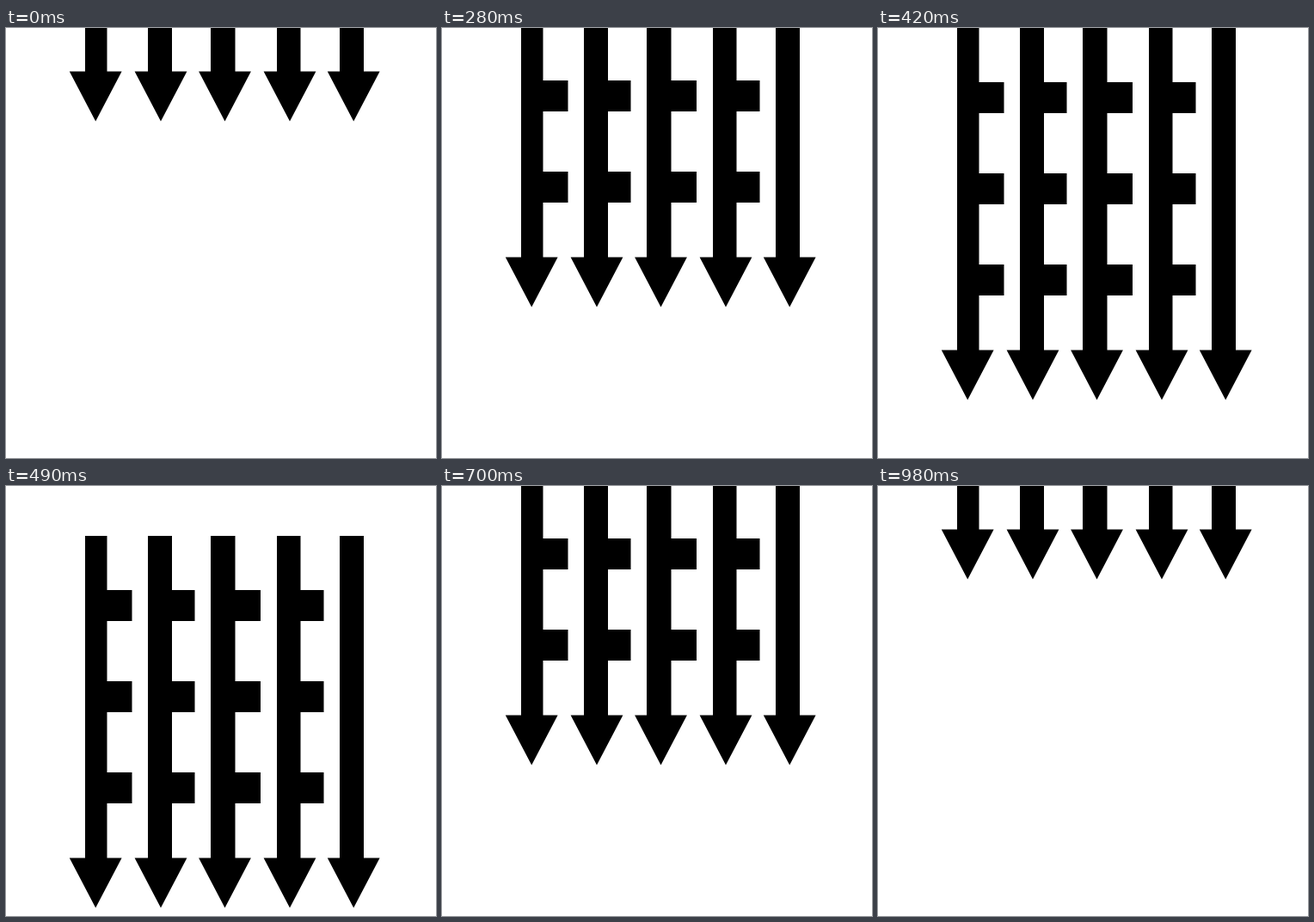
An HTML page that plays this animation: 500 by 500 pixels, repeating every 1.05 s.

```html
<!DOCTYPE html>
<html lang="en">
<head>
<meta charset="utf-8">
<title>Portcullis</title>
<style>
  html, body { margin: 0; width: 100%; height: 100%; overflow: hidden; background: #fff; }
  svg { display: block; width: 500px; height: 500px; }
</style>
</head>
<body>
<svg viewBox="0 0 500 500"><path id="gate" fill="#000"/></svg>
<script>
  const STEP = 70, TRAVEL = 54, TIP = 432.5, SHOULDER = 374.5;
  // stem left, stem right, tip x, rung right end (0 = no rungs)
  const bars = [
    [92, 117.5, 104.2, 146.5],
    [165, 193, 180, 219.5],
    [238, 266.5, 254.5, 296],
    [315, 342.5, 330, 369.5],
    [388, 416, 404.2, 0]
  ];
  const rungTops = [63, 169, 275];

  const rect = (l, t, r, b) => `M${l} ${t}H${r}V${b}H${l}Z`;
  const head = x => `M${x - 30.4} ${SHOULDER}H${x + 30.4}L${x} ${TIP}Z`;

  const gate = document.getElementById('gate');
  gate.setAttribute('d', bars.map(([l, r, x, end]) =>
    rect(l, 0, r, SHOULDER + 1) + head(x) +
    (end ? rungTops.map(y => rect(r - 1, y, end, y + 36)).join('') : '')
  ).join(''));

  // Drop in even steps, dip once past the rest position, then rise again.
  const drop = [6, 5, 4, 3, 2, 1, 0].map(n => -n * TRAVEL);
  const shifts = [...drop, 58, ...drop.slice().reverse()];
  const frames = [...shifts, shifts[0]].map((y, i) => ({
    offset: i / shifts.length,
    transform: `translate(0px, ${y}px)`,
    easing: 'steps(1, end)'
  }));
  gate.animate(frames, { duration: shifts.length * STEP, iterations: Infinity });
</script>
</body>
</html>
```
